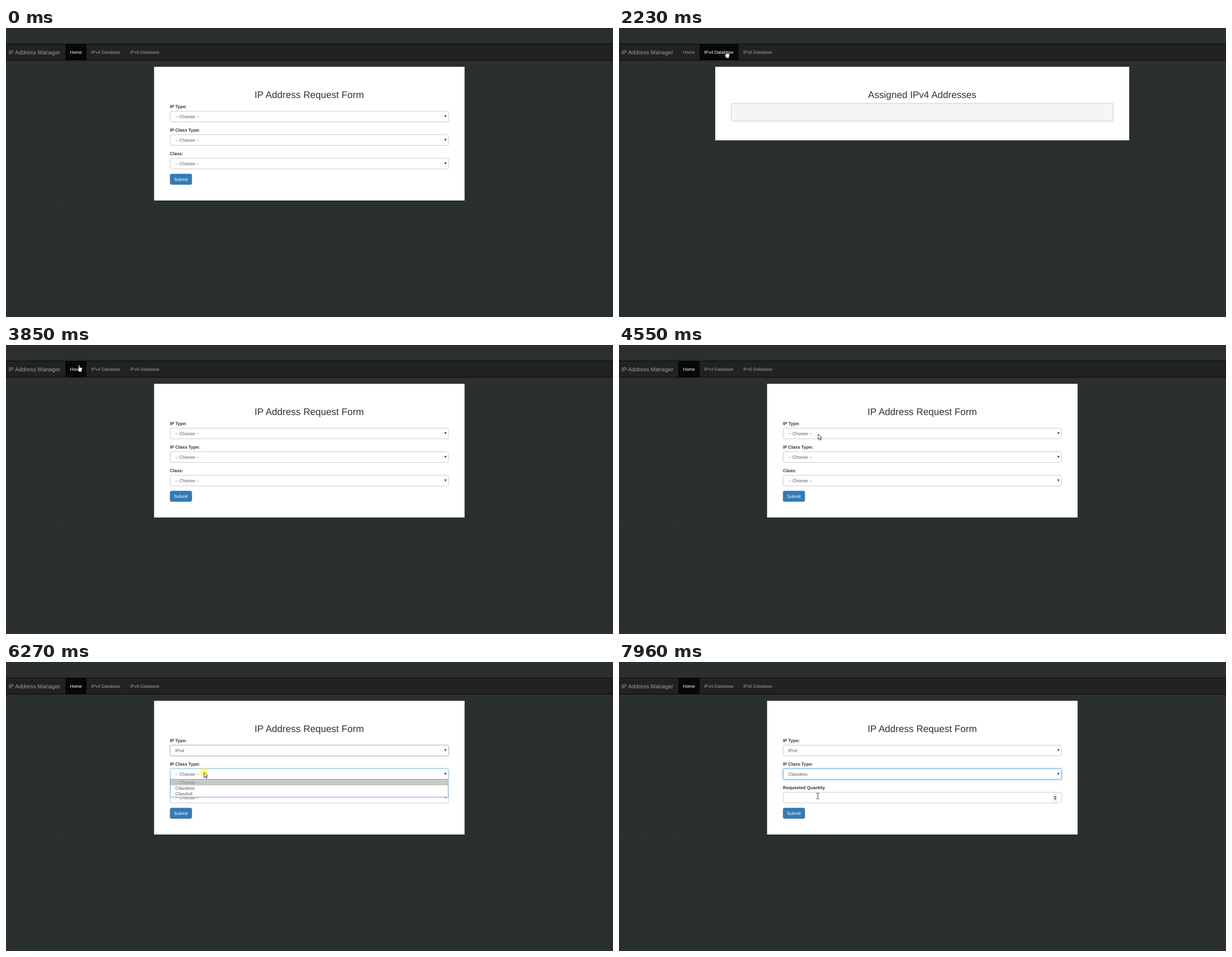
An HTML page that plays this animation: 1085x516 px, repeating every 8 s.

```html
<!DOCTYPE html>
<html lang="en">
<head>
<meta charset="utf-8">
<title>IP Address Manager</title>
<style>
  html, body { margin: 0; width: 100%; height: 100%; overflow: hidden; background: #2a2f2f; }
  svg { display: block; font-family: "Liberation Sans", Arial, sans-serif; text-rendering: geometricPrecision; }
  .glow { filter: drop-shadow(0 0 2px rgba(102, 175, 233, .6)); }
</style>
</head>
<body>
<svg id="stage" width="1085" height="516" viewBox="0 0 1085 516"></svg>
<script>
const LOOP = 8000, FONT = 7.98, ROW = 10.25, GAP = 42.1;
const stage = document.getElementById('stage');

// Bursts of activity: start, end, number of steps
const bursts = [
  [630, 1370, 11], [1450, 1530, 2], [1760, 2540, 11], [2620, 3380, 11],
  [3470, 3620, 3], [3780, 4550, 11], [4620, 4710, 2], [5100, 5400, 5],
  [5800, 6590, 11], [6650, 7190, 8], [7650, 7960, 5]
];

// Pointer path: time, x, y
const path = [
  [630, 1007, 489], [1000, 430, 165], [1370, 179, 37], [1530, 148, 38.3],
  [1910, 148, 38.3], [2540, 235, 44], [2770, 235, 44], [3076, 199, 44.3],
  [3380, 140, 43], [3620, 130.5, 35.5], [3930, 130.5, 35.5], [4550, 356, 159],
  [5030, 356, 159], [5400, 354, 186], [5880, 354, 186], [6195, 354, 197],
  [6350, 354, 197], [6590, 354, 208], [7190, 354, 223], [7720, 354, 223],
  [7960, 355.3, 239.3]
];

const clicks = [[1760, 1830], [2620, 2690], [3780, 3850], [4620, 4700],
  [5800, 5900], [6190, 6300], [7650, 7720]];

const tabs = [
  { name: 'Home', x: 106, w: 38 },
  { name: 'IPv4 Database', x: 144, w: 69.5 },
  { name: 'IPv6 Database', x: 213.5, w: 69.5 }
];

const clamp = v => Math.max(0, Math.min(1, v));
const within = (t, a, b) => t >= a && t < b;

function stepTime(t) {
  let time = 0;
  for (const [start, end, n] of bursts) {
    if (t + 6 < start) break;
    const d = (end - start) / (n - 1);
    time = start + d * Math.min(n - 1, Math.floor((t - start + 6) / d));
  }
  return time;
}

function pointerAt(t) {
  const i = path.findIndex(p => p[0] > t);
  if (i < 0) return path[path.length - 1].slice(1);
  const a = path[i - 1], b = path[i], k = (t - a[0]) / (b[0] - a[0]);
  return [a[1] + (b[1] - a[1]) * k, a[2] + (b[2] - a[2]) * k];
}

const rect = (x, y, w, h, fill, more = '') =>
  `<rect x="${x}" y="${y}" width="${w}" height="${h}" fill="${fill}" ${more}/>`;
const text = (x, y, s, fill, size = FONT, more = '') =>
  `<text x="${x}" y="${y}" fill="${fill}" font-size="${size}" ${more}>${s}</text>`;
const shape = (d, more) => `<path d="${d}" ${more}/>`;
const title = s => text(542, 124.7, s, '#333', 17.1, 'text-anchor="middle"');

function navbar(page, x, y) {
  let out = rect(0, 28, 1085, 30, '#080808') + rect(0, 29, 1085, 28, '#222')
    + text(4.4, 46.8, 'IP Address Manager', '#9d9d9d', 10.26);
  tabs.forEach((tab, i) => {
    const hover = y < 57 && within(x, tab.x, tab.x + tab.w);
    if (i === page) out += rect(tab.x, 29, tab.w, 28, '#080808');
    out += text(tab.x + 8.4, 46, tab.name, i === page || hover ? '#fff' : '#9d9d9d');
  });
  return out;
}

function field(i, label, value, focus, number) {
  const y = i * GAP, box = [293.5, 148.5 + y, 497.5, 19];
  let out = text(293, 142.5 + y, label, '#333', FONT, 'font-weight="bold"')
    + rect(...box, '#fff', 'stroke="#ccc" rx="2.3"');
  if (focus) out += rect(...box, '#fff', `stroke="#66afe9" rx="2.3" class="glow" opacity="${focus}"`);
  out += text(302.6, 160.7 + y, value, '#555');
  return out + (number
    ? rect(775, 150.5 + y, 9, 15, '#f1f1f1')
      + shape(`M777.2 ${157.3 + y}h4.8l-2.4-2.8zm0 1.8h4.8l-2.4 2.8z`, 'fill="#444"')
    : shape(`M783.4 ${155.8 + y}h4.2l-2.1 4z`, 'fill="#444"'));
}

function dropdown(i, options, py) {
  const top = 168 + i * GAP, over = Math.floor((py - top) / ROW);
  let out = rect(293.5, top - .5, 497, 31.6, '#fff', 'stroke="#6f9bd8"');
  options.forEach((name, n) => {
    const y = top + n * ROW, hot = n === over;
    if (hot || (over < 0 && n === 0)) out += rect(294, y, 496.5, ROW, hot ? '#1e90ff' : '#c8c8c8');
    out += text(302.8, y + 7.6, name, n === 0 ? '#808080' : hot ? '#fff' : '#555');
  });
  return out;
}

function form(t, py) {
  const choose = '-- Choose --', swap = clamp((t - 6195) / 150), sized = t >= 7720;
  let out = text(0, 317, 'No address has been assigned', '#333')
    + rect(264.7, 69.3, 555, 238.7, '#fff') + title('IP Address Request Form')
    + field(0, 'IP Type:', t >= 5870 ? 'IPv4' : choose, clamp((t - 4560) / 150) * (1 - swap))
    + field(1, 'IP Class Type:', sized ? 'Classless' : choose, swap)
    + field(2, sized ? 'Requested Quantity' : 'Class:', sized ? '' : choose, 0, sized)
    + rect(293.3, 260.7, 38.8, 18.7, '#337ab7', 'stroke="#2e6da4" stroke-width=".6" rx="2.3"')
    + text(312.7, 272.8, 'Submit', '#fff', FONT, 'text-anchor="middle"');
  if (within(t, 4700, 5870)) out += dropdown(0, [choose, 'IPv4', 'IPv6'], py);
  if (within(t, 6270, 7720)) out += dropdown(1, [choose, 'Classless', 'Classfull'], py);
  return out;
}

const listing = version => rect(172, 69.3, 740, 131.2, '#fff')
  + title(`Assigned IPv${version} Addresses`)
  + rect(200.5, 134.3, 683, 32, '#f5f5f5', 'stroke="#ccc" rx="2.3"');

function pointer(t, x, y) {
  const outline = 'fill="#fff" stroke="#111" stroke-width=".8" stroke-linejoin="round"';
  let out = clicks.some(c => within(t, ...c))
    ? `<circle cx="${x}" cy="${y}" r="7" fill="#ff0" opacity=".55"/>` : '';
  let icon;
  if (y < 57 && within(x, 106, 283)) {
    icon = shape('M-.9 .9Q-.9 0 0 0Q.9 0 .9 .9V4.2L4.9 5Q6 5.4 5.8 6.8L4.8 10.2V12.5H-.6V11.2L-3.3 7.6Q-3.6 6.2-2.2 6.6L-.9 7.8Z', outline);
  } else if (t >= 7720 && y > 232) {
    icon = shape('M-2.5-5H-.6L0-4.4 .6-5H2.5M0-4.4V4.4M-2.5 5H-.6L0 4.4 .6 5H2.5', 'fill="none" stroke="#222" stroke-width=".9"');
  } else {
    icon = shape('M0 0V9.5L2.2 7.4 3.8 11 5.3 10.3 3.7 6.9H6.7Z', outline);
  }
  return out + `<g transform="translate(${x} ${y})">${icon}</g>`;
}

function draw(t) {
  const page = within(t, 1830, 2690) ? 1 : within(t, 2690, 3850) ? 2 : 0;
  const shown = t >= 630, [x, y] = shown ? pointerAt(t) : [-99, 999];
  stage.innerHTML = navbar(page, x, y)
    + (page ? listing(page === 1 ? 4 : 6) : form(t, y))
    + (shown ? pointer(t, x, y) : '');
}

const begin = performance.now();
let last = -1;
function tick() {
  const t = stepTime((performance.now() - begin) % LOOP);
  if (t !== last) draw(last = t);
  requestAnimationFrame(tick);
}
tick();
</script>
</body>
</html>
```
